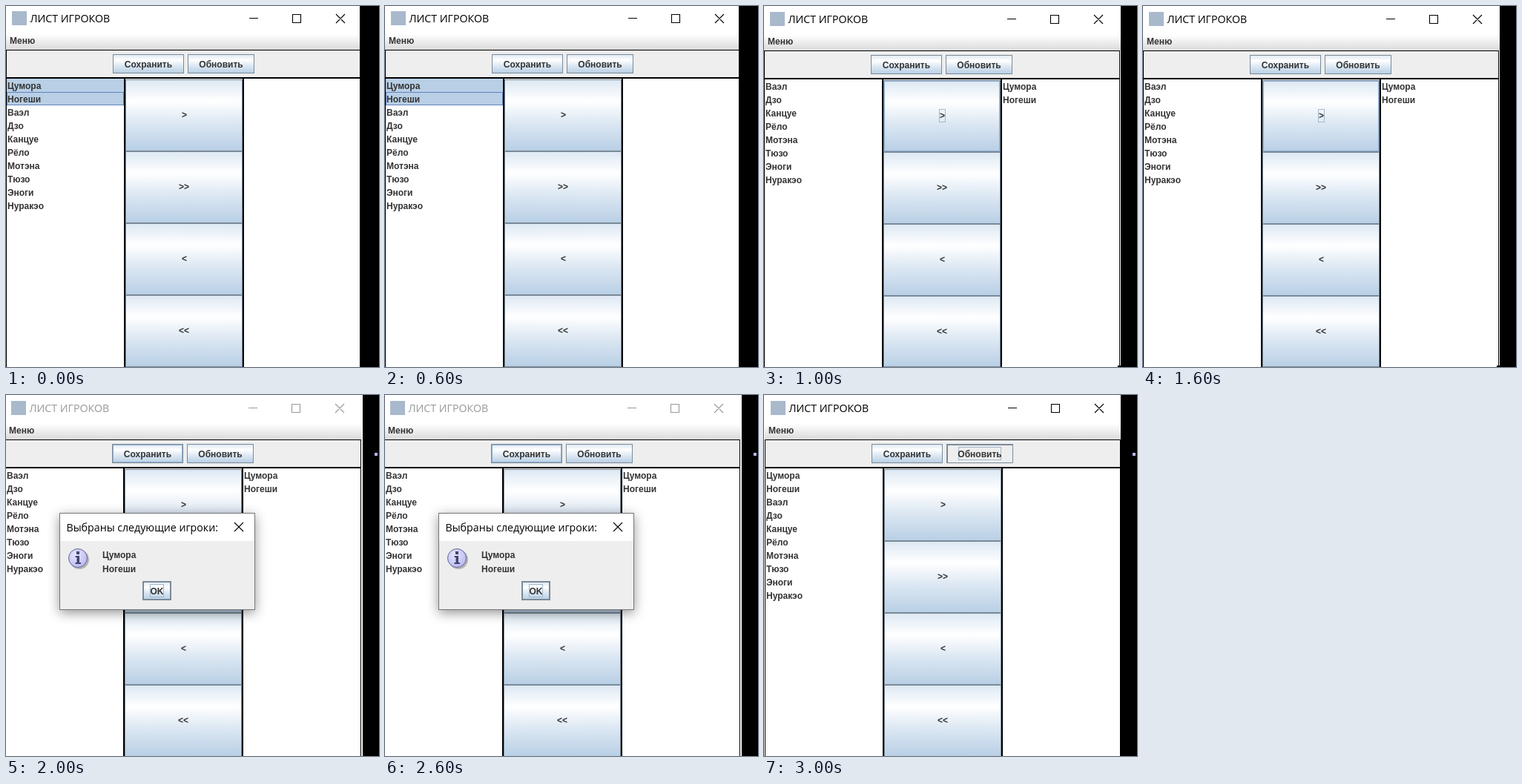
An HTML page for the animation above (4 s loop, 503x487 px).

```html
<!DOCTYPE html>
<html lang="ru">
<head>
<meta charset="utf-8">
<title>Лист игроков</title>
<style>
html, body { margin: 0; width: 100%; height: 100%; overflow: hidden; background: #000; }
svg { display: block; width: 503px; height: 487px; }
text { font: bold 12px "Liberation Sans", Arial, sans-serif; fill: #333; }
.mid { text-anchor: middle; }
.caption { font: 14.2px "Open Sans", "Noto Sans", sans-serif; fill: currentColor; }
.edge { fill: none; stroke: #7a8a99; }
.hover { fill: none; stroke: #8fb0d3; }
.focus { fill: none; stroke: #a3b8cc; }
.face { fill: url(#ocean); stroke: #7a8a99; }
.glyph { fill: none; stroke: currentColor; stroke-width: 1.1; }

/* Every state change is a hard cut on a whole second. */
.one, .two, .three, .window, .bar { animation: 4s step-end infinite; }
.one { animation-name: one; }
.two { animation-name: two; }
.three { animation-name: three; }
.window { animation-name: shift; }
.bar { animation-name: dim; }
.at1 { animation-delay: -3s; }
.at2 { animation-delay: -2s; }
.at3 { animation-delay: -1s; }
@keyframes one { 0% { visibility: visible; } 25%, 100% { visibility: hidden; } }
@keyframes two { 0% { visibility: visible; } 50%, 100% { visibility: hidden; } }
@keyframes three { 0% { visibility: visible; } 75%, 100% { visibility: hidden; } }
@keyframes shift {
  0% { transform: translate(0, 0); }
  25% { transform: translate(0, 1px); }
  50% { transform: translate(-1px, 1px); }
  75%, 100% { transform: translate(1px, 1px); }
}
@keyframes dim { 0% { color: #000; } 50% { color: #999; } 75%, 100% { color: #000; } }
</style>
</head>
<body>
<svg viewBox="0 0 503 487">
  <defs>
    <linearGradient id="ocean" x2="0" y2="1">
      <stop offset="0" stop-color="#dde8f3"/>
      <stop offset=".3" stop-color="#fff"/>
      <stop offset=".6" stop-color="#dde8f3"/>
      <stop offset="1" stop-color="#b8cfe5"/>
    </linearGradient>
    <linearGradient id="menu" x2="0" y2="1">
      <stop offset="0" stop-color="#fff"/>
      <stop offset="1" stop-color="#dadada"/>
    </linearGradient>
    <radialGradient id="orb" cx=".4" cy=".35" r=".7">
      <stop offset="0" stop-color="#e6e6ff"/>
      <stop offset="1" stop-color="#b8b8f0"/>
    </radialGradient>
    <rect id="big" class="face" x="161.5" y=".5" width="157" height="96"/>
    <g id="pair">
      <text>Цумора</text>
      <text y="18">Ногеши</text>
    </g>
    <g id="rest">
      <text>Ваэл</text>
      <text y="18">Дзо</text>
      <text y="36">Канцуе</text>
      <text y="54">Рёло</text>
      <text y="72">Мотэна</text>
      <text y="90">Тюзо</text>
      <text y="108">Эноги</text>
      <text y="126">Нуракэо</text>
    </g>
  </defs>

  <rect width="481" height="487" fill="#fff"/>

  <g class="window">
    <g class="bar">
      <rect x="8" y="7" width="20" height="19" fill="#a9b9cc"/>
      <text class="caption" x="32.5" y="22">ЛИСТ ИГРОКОВ</text>
      <path class="glyph" d="M328 16.5h12M386.5 11.5h11v11h-11zM445 11l12 12M457 11l-12 12"/>
    </g>

    <rect y="38" width="481" height="21" fill="url(#menu)"/>
    <text x="5" y="51">Меню</text>

    <rect y="59" width="480" height="440"/>
    <rect x="1" y="60" width="478" height="36" fill="#eee"/>
    <rect x="1" y="98" width="158" height="400" fill="#fff"/>
    <rect x="161" y="98" width="158" height="400" fill="#eee"/>
    <rect x="321" y="98" width="158" height="400" fill="#fff"/>

    <rect class="face" x="144.5" y="65.5" width="95" height="25"/>
    <rect class="hover one at2" x="145.5" y="66.5" width="93" height="23"/>
    <text class="mid" x="192" y="83">Сохранить</text>

    <rect class="face" x="245.5" y="65.5" width="89" height="25"/>
    <g class="one at3">
      <rect class="edge" x="245.5" y="65.5" width="89" height="25" style="fill:#eee"/>
      <path class="edge" d="M246 66.5h88M246.5 66v24"/>
      <rect class="focus" x="261.5" y="69.5" width="57" height="17"/>
    </g>
    <text class="mid" x="290" y="83">Обновить</text>

    <use href="#big" y="99"/>
    <use href="#big" y="196"/>
    <use href="#big" y="293"/>
    <use href="#big" y="390"/>
    <g class="one at1">
      <rect class="hover" x="162.5" y="100.5" width="155" height="94"/>
      <rect class="focus" x="236.5" y="138.5" width="8" height="17"/>
    </g>
    <text class="mid" x="240.5" y="151">&gt;</text>
    <text class="mid" x="240" y="248">&gt;&gt;</text>
    <text class="mid" x="240.5" y="345">&lt;</text>
    <text class="mid" x="240" y="442">&lt;&lt;</text>

    <g class="one">
      <rect x="1" y="98" width="158" height="36" fill="#b8cfe5"/>
      <rect x="1.5" y="116.5" width="157" height="17" fill="none" stroke="#6382bf"/>
    </g>
    <g class="two at3">
      <use href="#pair" x="2" y="112"/>
      <use href="#rest" x="2" y="148"/>
    </g>
    <g class="two at1">
      <use href="#rest" x="2" y="112"/>
      <use href="#pair" x="322" y="112"/>
    </g>
  </g>

  <rect class="one" x="477" width="4" height="487"/>
  <g class="one at1">
    <rect x="477" y="485" width="4" height="2"/>
    <rect x="161" y="486" width="158" height="1" fill="#7a8a99"/>
  </g>
  <rect x="481" width="22" height="487"/>
  <rect class="two at2" x="497" y="78" width="4" height="4" fill="#b9b5ee"/>

  <g class="one at2">
    <rect x="72" y="159" width="264" height="131" fill="#777" style="filter:drop-shadow(0 4px 8px rgba(0,0,0,.42))"/>
    <rect x="73" y="160" width="262" height="37" fill="#fff"/>
    <rect x="73" y="197" width="262" height="92" fill="#eee"/>
    <text class="caption" x="81.5" y="184" style="fill:#000">Выбраны следующие игроки:</text>
    <path class="glyph" d="M308 172l12 12M320 172l-12 12"/>
    <circle cx="99" cy="222" r="13" fill="#b4b4b4"/>
    <circle cx="97" cy="220" r="12.5" fill="url(#orb)" stroke="#666699"/>
    <path d="M95 211h4v4h-4zM93.500 217h5.500v9h2v2h-7.500v-2h2v-7h-2z" fill="#44446e"/>
    <text x="130" y="220">Цумора</text>
    <text x="130" y="239">Ногеши</text>
    <rect class="face" x="185" y="252" width="37" height="24" stroke-width="2"/>
    <rect class="focus" x="194.500" y="255.500" width="18" height="17"/>
    <text class="mid" x="203.500" y="269">OK</text>
  </g>
</svg>
</body>
</html>
```
